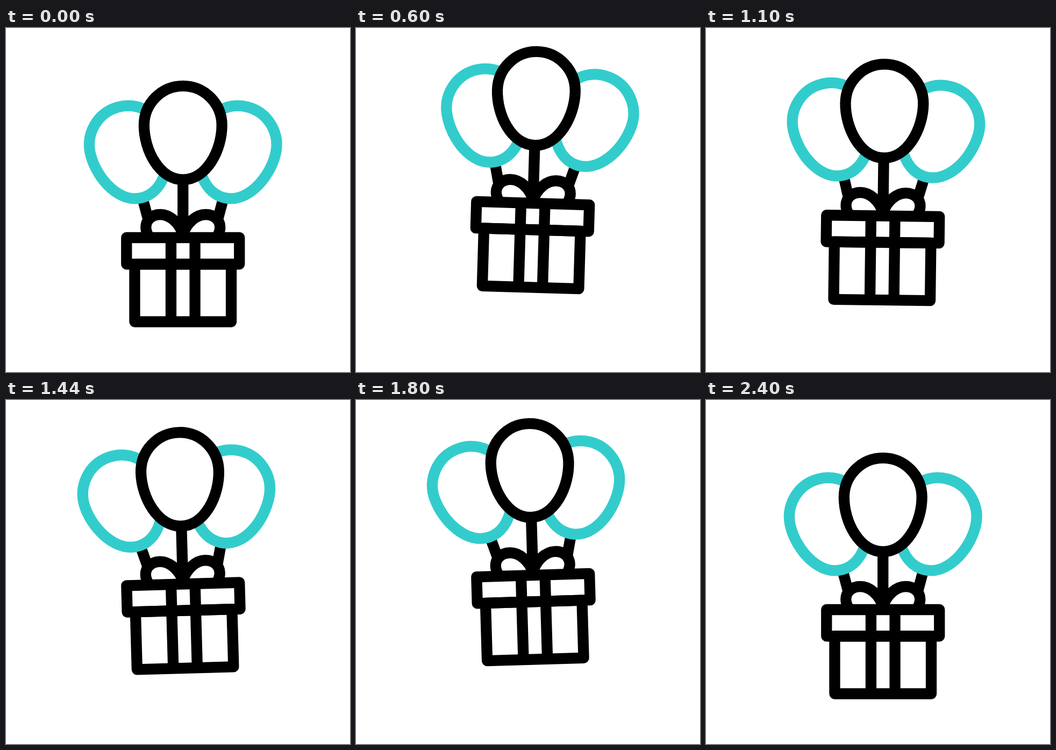
Recreate the animation shown at these times as an HTML page with a canvas. Size 640x640 px, loop 2420 ms.

```html
<!DOCTYPE html>
<html lang="en">
<head>
<meta charset="utf-8">
<title>Gift with balloons</title>
<style>
  html, body { margin: 0; width: 100%; height: 100%; overflow: hidden; background: #fff; }
  canvas { display: block; width: 100%; height: 100%; }
</style>
</head>
<body>
<canvas id="stage" width="640" height="640"></canvas>
<script>
const ctx = document.getElementById('stage').getContext('2d');
const BLACK = '#000', TEAL = '#33cccc', WHITE = '#fff';
const LOOP = 2420;
const MID_X = 329.25, LID_Y = 390;
const RAD = Math.PI / 180;

const ease = p => p * p * (3 - 2 * p);

// Eased value through evenly spaced keys; the last key holds.
function keyed(time, step, keys) {
  const i = Math.min(Math.floor(time / step), keys.length - 2);
  const p = Math.min(time / step - i, 1);
  return keys[i] + (keys[i + 1] - keys[i]) * ease(p);
}

function line(x1, y1, x2, y2) {
  ctx.beginPath();
  ctx.moveTo(x1, y1);
  ctx.lineTo(x2, y2);
  ctx.stroke();
}

// Egg outline: round upper half, longer lower half, centred on its widest row.
function balloon(cx, cy, color) {
  const r = 72.4, up = 73.2, down = 101.2, k = 0.5523;
  ctx.save();
  ctx.translate(cx, cy);
  ctx.beginPath();
  ctx.moveTo(0, -up);
  ctx.bezierCurveTo(r * k, -up, r, -up * k, r, 0);
  ctx.bezierCurveTo(r, 46, 44, down, 0, down);
  ctx.bezierCurveTo(-44, down, -r, 46, -r, 0);
  ctx.bezierCurveTo(-r, -up * k, -r * k, -up, 0, -up);
  ctx.closePath();
  ctx.fillStyle = WHITE;
  ctx.fill();
  ctx.strokeStyle = color;
  ctx.stroke();
  ctx.restore();
}

function sideBalloon(side, sway) {
  ctx.save();
  ctx.translate(side * 65.25, 354 - LID_Y);
  ctx.rotate(side * 15 * RAD + sway);
  ctx.strokeStyle = BLACK;
  line(0, 0, 0, -38);
  balloon(0, -141, TEAL);
  ctx.restore();
}

function bowLoop(side) {
  ctx.save();
  ctx.scale(side, 1);
  ctx.beginPath();
  ctx.moveTo(0, -6);
  ctx.bezierCurveTo(7, -28, 25, -43, 42, -43);
  ctx.bezierCurveTo(59, -43, 69, -32, 69, -19);
  ctx.bezierCurveTo(69, -13, 67, -8, 64, -3);
  ctx.stroke();
  ctx.restore();
}

function box() {
  ctx.strokeRect(-105, 0, 210, 49.3);
  ctx.strokeRect(-89.8, 49.3, 179.6, 107.2);
  for (const x of [-22.3, 22.3]) line(x, 0, x, 156.5);
}

function draw(time) {
  const lift = keyed(time, 600, [0, -64, -38.6, -64, 0]);
  const swing = keyed(time, 800, [0, 1, -1, 0]);

  ctx.fillStyle = WHITE;
  ctx.fillRect(0, 0, 640, 640);
  ctx.save();
  ctx.translate(MID_X, LID_Y + lift);
  ctx.rotate(swing * 2 * RAD);
  ctx.lineWidth = 20.3;
  ctx.lineJoin = 'round';

  for (const side of [-1, 1]) sideBalloon(side, swing * 4 * RAD);
  balloon(0, 181 - LID_Y, BLACK);
  line(0, -108, 0, 0);
  bowLoop(-1);
  bowLoop(1);
  box();
  ctx.restore();
}

function tick(now) {
  draw(now % LOOP);
  requestAnimationFrame(tick);
}

draw(0);
requestAnimationFrame(tick);
</script>
</body>
</html>
```
